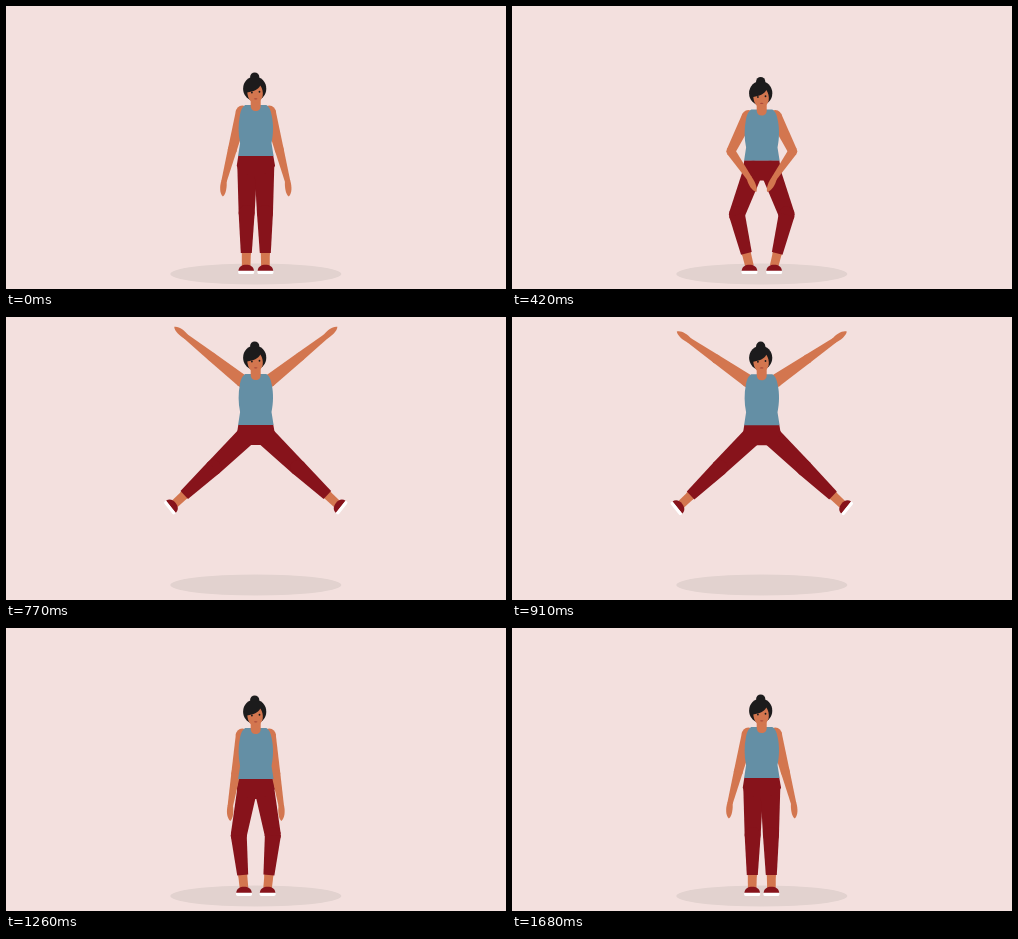
An HTML page with a canvas that plays this animation: 500x283 px, repeating every 2.1 s.

```html
<!DOCTYPE html>
<html lang="en">
<head>
<meta charset="utf-8">
<title>Star jump</title>
<style>
  html, body { margin: 0; width: 100%; height: 100%; overflow: hidden; background: #f3e0de; }
  canvas { display: block; width: 500px; height: 283px; }
</style>
</head>
<body>
<canvas id="stage"></canvas>
<script>
const W = 500, H = 283, STEP = 70, LOOP = 2100, CENTER = 249.8;
const SKIN = '#d3764f', TOP = '#648fa5', PANTS = '#87131b', HAIR = '#1c1b1c';

// step, body lift, then angles from straight down: upper arm, forearm, hand, thigh, shin
const KEYS = [
  [0, 0, 14.8, 14.8, 4, 0.8, 0.5],
  [6, 4.5, 26.6, -34.5, -27, 20.4, -13.7],
  [8, -8, 46, 48, 44, 26, -1],
  [9, -20, 82.8, 82.8, 84, 35, 17.5],
  [11, -42, 128.2, 128.2, 130, 46, 47],
  [12, -46, 135, 135, 138, 48, 51],
  [15, -22, 73.6, 73.6, 67, 34.4, 24.3],
  [16, -11, 43, 42, 34, 23, 12],
  [18, 1, 9.6, 9.6, 0, 10.5, -5.7],
  [20, 3.3, 18, -16, -14, 18, -12],
  [24, 0, 14.8, 14.8, 4, 0.8, 0.5]
];

const ctx = document.getElementById('stage').getContext('2d');
const ratio = window.devicePixelRatio || 1;
ctx.canvas.width = W * ratio;
ctx.canvas.height = H * ratio;

const shapes = {
  tank: new Path2D('M239 99H260C263 101 264.5 104 265.5 110C267.2 118 267.2 128 265.2 137L267.3 150H231.8L233.8 137C231.9 128 231.9 118 233.5 110C234.5 104 236 101 239 99Z'),
  pelvis: new Path2D('M232 149.7H267L268.8 160L256 170H243L230.4 160Z'),
  neck: new Path2D('M244.4 91H254.4V100C254.4 103 252.5 105 249.4 105S244.4 103 244.4 100Z'),
  face: new Path2D('M241 86.5C247 85.5 252 83.5 254 79.5C256 82 257 86 256.4 90C255.5 94 252 97 249 97C245 97 241.5 93 241 86.5Z'),
  hand: new Path2D('M-2.6 -1C-4 5 -3.6 12 0 15C3 12.5 3.6 5 2.6 -1Z'),
  shoe: new Path2D('M-7.8 5C-7.5 0.5 -4 -1.2 0 -1.2S7.5 0.5 7.8 5Z'),
  sole: new Path2D('M-8 4.8H8V6.4Q8 8 6.4 8H-6.4Q-8 8 -8 6.4Z')
};

function slope(i, c) {
  if (i === 0 || i === KEYS.length - 1) return 0;
  const [a, b, d] = [KEYS[i - 1], KEYS[i], KEYS[i + 1]];
  const before = (b[c] - a[c]) / (b[0] - a[0]);
  const after = (d[c] - b[c]) / (d[0] - b[0]);
  return before * after <= 0 ? 0 : 2 * before * after / (before + after);
}

function poseAt(step) {
  const s = Math.min(step, 24);
  let i = 0;
  while (i < KEYS.length - 2 && s >= KEYS[i + 1][0]) i++;
  const a = KEYS[i], b = KEYS[i + 1], span = b[0] - a[0];
  const u = (s - a[0]) / span, v = 1 - u;
  return a.slice(1).map((from, n) => {
    const c = n + 1;
    return v * v * (1 + 2 * u) * from + u * u * (3 - 2 * u) * b[c] +
      span * u * v * (v * slope(i, c) - u * slope(i + 1, c));
  });
}

const rad = deg => deg * Math.PI / 180;
const reach = (p, len, deg) => ({ x: p.x - len * Math.sin(rad(deg)), y: p.y + len * Math.cos(rad(deg)) });

function fill(shape, color) {
  ctx.fillStyle = color;
  ctx.fill(shape);
}

function oval(x, y, rx, ry, color) {
  ctx.beginPath();
  ctx.ellipse(x, y, rx, ry, 0, 0, 7);
  ctx.fillStyle = color;
  ctx.fill();
}

// tapered segment with a round start
function limb(p, q, r0, r1, color) {
  const len = Math.hypot(q.x - p.x, q.y - p.y) || 1;
  const nx = (p.y - q.y) / len, ny = (q.x - p.x) / len;
  oval(p.x, p.y, r0, r0, color);
  ctx.beginPath();
  ctx.moveTo(p.x + nx * r0, p.y + ny * r0);
  ctx.lineTo(q.x + nx * r1, q.y + ny * r1);
  ctx.lineTo(q.x - nx * r1, q.y - ny * r1);
  ctx.lineTo(p.x - nx * r0, p.y - ny * r0);
  ctx.fill();
}

function place(p, deg, draw) {
  ctx.save();
  ctx.translate(p.x, p.y);
  ctx.rotate(rad(deg));
  draw();
  ctx.restore();
}

function bothSides(draw) {
  for (const side of [1, -1]) {
    ctx.save();
    ctx.translate(CENTER, 0);
    ctx.scale(side, 1);
    draw();
    ctx.restore();
  }
}

function leg(lift, thigh, shin) {
  const hip = { x: -8.5, y: 160 + lift };
  const knee = reach(hip, 47, thigh);
  const hem = reach(knee, 40, shin);
  const ankle = reach(hem, 13, shin);
  ankle.y = Math.min(ankle.y, 260);
  limb(hem, ankle, 4.5, 4.3, SKIN);
  place(ankle, Math.max(0, shin < 1 ? 0 : shin * 1.1), () => {
    fill(shapes.shoe, PANTS);
    fill(shapes.sole, '#fff');
  });
  limb(hip, knee, 10, 8, PANTS);
  limb(knee, hem, 8, 5.5, PANTS);
}

function arm(lift, upper, fore, hand) {
  const shoulder = { x: -13.5, y: 106 + lift };
  const elbow = reach(shoulder, 39, upper);
  const wrist = reach(elbow, 33, fore);
  limb(shoulder, elbow, 6.5, 4.5, SKIN);
  limb(elbow, wrist, 4.5, 2.7, SKIN);
  place(wrist, hand, () => fill(shapes.hand, SKIN));
}

function head() {
  oval(248.4, 71, 4.6, 4.6, HAIR);
  oval(248.4, 82.7, 11.6, 12.2, HAIR);
  fill(shapes.neck, SKIN);
  fill(shapes.face, SKIN);
  oval(245.6, 86.6, 0.9, 1, HAIR);
  oval(253.2, 85.8, 0.9, 1, HAIR);
  oval(249.4, 92.8, 1.8, 0.6, '#a8483a');
}

function draw(step) {
  const [lift, upper, fore, hand, thigh, shin] = poseAt(step);
  const atBody = paint => {
    ctx.save();
    ctx.translate(CENTER - 249.5, lift);
    paint();
    ctx.restore();
  };
  ctx.setTransform(ratio, 0, 0, ratio, 0, 0);
  ctx.fillStyle = '#f3e0de';
  ctx.fillRect(0, 0, W, H);
  oval(CENTER, 268, 85.5, 10.6, '#e2d2cf');
  bothSides(() => leg(lift, thigh, shin));
  atBody(() => fill(shapes.pelvis, PANTS));
  bothSides(() => arm(lift, upper, fore, hand));
  atBody(() => {
    fill(shapes.tank, TOP);
    head();
  });
}

function tick() {
  draw(Math.floor(performance.now() % LOOP / STEP));
  requestAnimationFrame(tick);
}
tick();
</script>
</body>
</html>
```
